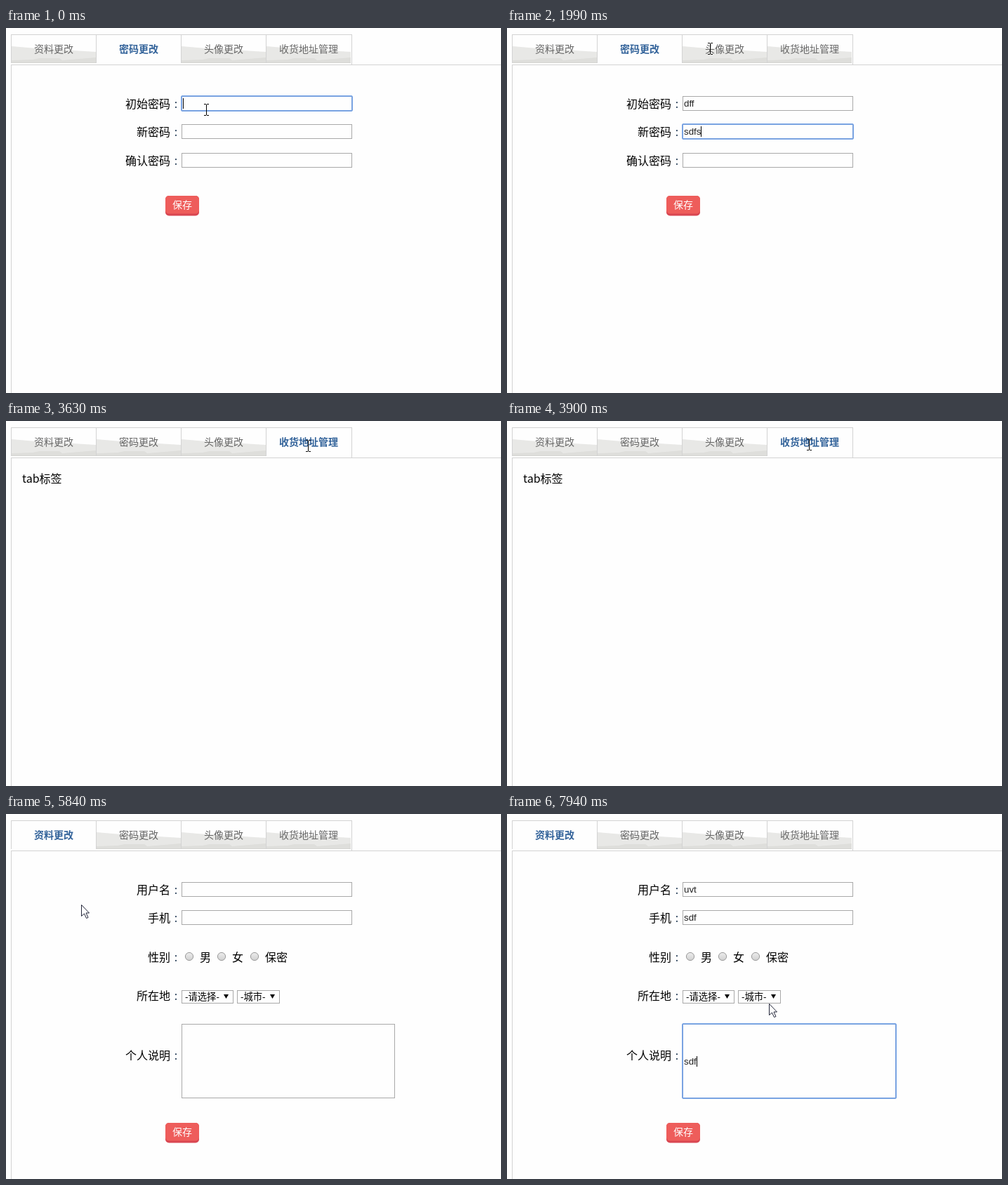
These frames come from a looping animation (705 by 520 pixels, 8 s). An HTML page with a canvas:

```html
<!DOCTYPE html>
<html lang="zh-CN">
<head>
<meta charset="utf-8">
<title>账户设置</title>
<style>
  html, body { margin: 0; width: 100%; height: 100%; overflow: hidden; background: #fefefe; }
  canvas { display: block; }
</style>
</head>
<body>
<canvas id="stage" width="705" height="520"></canvas>
<script>
const ctx = document.getElementById('stage').getContext('2d');
const LOOP = 8000;
const CJK = '"Noto Sans CJK SC", "Noto Sans CJK", sans-serif';
const CENTRED_MARKS = `"Noto Sans CJK TC", ${CJK}`;
const ARIAL = `"Liberation Sans", ${CJK}`;
const PROFILE = 0, PASSWORD = 1, AVATAR = 2, ADDRESS = 3;
const TABS = ['资料更改', '密码更改', '头像更改', '收货地址管理'];
const TAB_X = [7, 128, 249, 370, 492];

// keys: [time of first character, ms per character]
const FIELDS = [
  { page: PASSWORD, y: 97, text: 'dff', focus: [0, 1190], keys: [120, 130] },
  { page: PASSWORD, y: 137, text: 'sdfs', focus: [1190, 2270], keys: [1323, 133] },
  { page: PASSWORD, y: 178, text: '' },
  { page: PROFILE, y: 97, text: 'uvt', focus: [6367, 7037], keys: [6630, 135] },
  { page: PROFILE, y: 137, text: 'sdf', focus: [7037, 7445], keys: [7037, 136] },
  { page: PROFILE, y: 299, w: 303, h: 105, text: 'sdf', focus: [7445, LOOP], keys: [7580, 120] },
];

// Pointer moves in discrete steps; the points are spread evenly over them.
const START = [285, 116];
const MOVES = [
  { from: 120, to: 510, steps: 4, path: [[286, 118], [288, 130], [291, 142], [292, 146]] },
  { from: 1190, to: 1990, steps: 7, path: [[292, 146], [292, 146], [292, 146], [291, 120], [290, 75], [289, 42], [289, 29]] },
  { from: 2270, to: 2270, steps: 1, path: [[289, 31]] },
  { from: 2550, to: 3510, steps: 8, path: [[325, 75], [370, 115], [399, 145], [408, 190], [408, 209], [418, 150], [427, 75], [430, 36]] },
  { from: 3630, to: 3900, steps: 3, path: [[430, 33]] },
  { from: 4180, to: 5150, steps: 8, path: [[424, 70], [330, 85], [160, 70], [63, 38]] },
  { from: 5570, to: 6500, steps: 8, path: [[85, 110], [130, 150], [250, 120], [313, 108]] },
  { from: 6630, to: 7580, steps: 8, path: [[313, 108], [313, 135], [313, 155], [313, 155], [313, 160], [316, 250], [320, 330], [320, 330]] },
  { from: 7700, to: 7940, steps: 3, path: [[374, 271]] },
];

const clamp = (v, lo, hi) => Math.max(lo, Math.min(hi, v));
const stepCount = (t, start, gap) => t < start ? 0 : Math.floor((t - start) / gap + 0.06) + 1;

function pageAt(t) {
  if (t < 2270) return PASSWORD;
  if (t < 3630) return AVATAR;
  return t < 5270 ? ADDRESS : PROFILE;
}

function pointerAt(t) {
  let pos = START;
  for (const { from, to, steps, path } of MOVES) {
    if (t < from) break;
    const gap = (to - from) / (steps - 1) || 1;
    const done = Math.min(stepCount(t, from, gap), steps) / steps * path.length;
    const points = [pos, ...path];
    const i = Math.min(Math.floor(done), path.length - 1);
    const a = points[i], b = points[i + 1], k = done - i;
    pos = [Math.round(a[0] + (b[0] - a[0]) * k), Math.round(a[1] + (b[1] - a[1]) * k)];
  }
  return pos;
}

function rect(x, y, w, h, color) {
  ctx.fillStyle = color;
  ctx.fillRect(x, y, w, h);
}

function frame(x, y, w, h, color) {
  ctx.strokeStyle = color;
  ctx.lineWidth = 1;
  ctx.strokeRect(x + 0.5, y + 0.5, w, h);
}

function roundRect(x, y, w, h, r, color) {
  ctx.fillStyle = color;
  ctx.beginPath();
  ctx.roundRect(x, y, w, h, r);
  ctx.fill();
}

function text(str, x, y, size, color = '#000', { align = 'left', weight = 350, family = CJK } = {}) {
  ctx.font = `${weight} ${size}px ${family}`;
  ctx.textAlign = align;
  ctx.fillStyle = color;
  ctx.fillText(str, x, y);
}

function polygon(points, color) {
  ctx.fillStyle = color;
  ctx.beginPath();
  points.forEach(([x, y]) => ctx.lineTo(x, y));
  ctx.closePath();
  ctx.fill();
}

function drawHills(x) {
  const w = 120;
  ctx.save();
  ctx.beginPath();
  ctx.rect(x, 10, w, 40);
  ctx.clip();
  ctx.translate(x, 0);
  polygon([[0, 26], [35, 29], [70, 31], [w, 34], [w, 50], [0, 50]], '#e8e8e6');
  polygon([[0, 46], [30, 45], [40, 43], [68, 43], [72, 46], [96, 44], [w, 42], [w, 50], [0, 50]], '#dededb');
  rect(0, 49, w, 1, '#d6d6d3');
  ctx.restore();
}

function drawTabs(active) {
  const line = '#d3d3d3';
  TABS.forEach((name, i) => {
    const x = TAB_X[i];
    const on = i === active;
    if (!on) drawHills(x + 1);
    text(name, x + 61, 35, 14, on ? '#33639a' : '#666', { align: 'center', weight: on ? 700 : 350 });
  });
  rect(7, 9, 486, 1, line);
  TAB_X.forEach((x, i) => rect(x, 9, 1, i === 4 ? 43 : 41, line));
  rect(7, 52, 698, 1, line);
  rect(7, 52, 1, 468, line);
}

function drawLabel(str, y) {
  text(str, 234, y + 6, 16, '#000', { align: 'right' });
  text(':', 242, y + 6, 16, '#1d3550', { align: 'center' });
}

function drawButton(str, x, y, w) {
  roundRect(x, y, w, 28.5, 5, '#d94752');
  roundRect(x, y, w, 25.5, 5, '#ee5d5b');
  text(str, x + w / 2, y + 18, 14, '#fff', { align: 'center' });
}

function drawField({ y, w = 242, h = 20, text: full, focus = [-1, -1], keys }, t) {
  const focused = t >= focus[0] - 4 && t < focus[1] - 4;
  frame(250, y, w, h, focused ? '#739ddd' : '#a9a9a9');
  if (focused) {
    ctx.strokeStyle = '#7fa9e6';
    ctx.beginPath();
    ctx.roundRect(249.5, y - 0.5, w + 2, h + 2, 1.5);
    ctx.stroke();
  }
  const typed = keys ? full.slice(0, clamp(stepCount(t, ...keys), 0, full.length)) : '';
  const mid = y + Math.floor(h / 2) + (h > 20 ? 1 : 0);
  text(typed, 252, mid + 5, 13.333, '#222', { family: ARIAL });
  const blinkedOff = t >= 910 && t < 1190;
  if (focused && !blinkedOff) {
    rect(252 + Math.round(ctx.measureText(typed).width), mid - 7, 1, 15, '#000');
  }
}

function drawRadio(x, y) {
  const shade = ctx.createLinearGradient(0, y - 6, 0, y + 6);
  shade.addColorStop(0, '#eee');
  shade.addColorStop(1, '#cfcfcf');
  ctx.beginPath();
  ctx.arc(x, y, 5.6, 0, Math.PI * 2);
  ctx.fillStyle = shade;
  ctx.fill();
  ctx.strokeStyle = '#9a9a9a';
  ctx.lineWidth = 1;
  ctx.stroke();
}

function drawSelect(str, x, w) {
  frame(x, 251, w, 18, '#a9a9a9');
  text(str, x + 5, 265, 13.333, '#000', { family: ARIAL });
  const cx = x + w - 9.5;
  polygon([[cx - 3.5, 257], [cx + 3.5, 257], [cx, 263]], '#000');
}

function drawProfile() {
  drawLabel('用户名', 108);
  drawLabel('手机', 148);
  drawLabel('性别', 204);
  drawLabel('所在地', 259);
  drawLabel('个人说明', 344);
  [['男', 261], ['女', 307], ['保密', 354]].forEach(([str, x]) => {
    drawRadio(x, 203);
    text(str, x + 15, 210, 16);
  });
  drawSelect('-请选择-', 250, 73);
  drawSelect('-城市-', 329, 60);
  drawButton('保存', 227, 440, 48);
}

function drawPassword() {
  drawLabel('初始密码', 108);
  drawLabel('新密码', 148);
  drawLabel('确认密码', 189);
  drawButton('保存', 227, 239, 48);
}

function drawAvatar() {
  rect(141, 105, 150, 150, '#c5cde0');
  ctx.fillStyle = '#e4e8f1';
  ctx.beginPath();
  ctx.moveTo(141, 255);
  ctx.lineTo(141, 243);
  ctx.bezierCurveTo(148, 222, 172, 217, 190, 211);
  ctx.quadraticCurveTo(201, 207, 200, 194);
  ctx.bezierCurveTo(188, 185, 184, 171, 181, 156);
  ctx.bezierCurveTo(181, 130, 195, 118, 214, 117);
  ctx.bezierCurveTo(234, 118, 246, 126, 251, 144);
  ctx.bezierCurveTo(247, 160, 248, 182, 238, 194);
  ctx.quadraticCurveTo(236, 207, 247, 211);
  ctx.bezierCurveTo(266, 217, 284, 222, 291, 243);
  ctx.lineTo(291, 255);
  ctx.fill();
  text('从电脑中选择你喜欢的图片', 345, 137, 14, '#f00');
  [['JPG、JPEG、', 345], ['GIF、', 419], ['或PNG等文件.', 452]]
    .forEach(([str, x]) => text(str, x, 165, 12, '#222', { family: CENTRED_MARKS }));
  drawButton('选择上传', 358, 217, 76);
}

function drawAddress() {
  text('tab标签', 23, 88, 16);
}

const PAGES = [drawProfile, drawPassword, drawAvatar, drawAddress];

function overText(page, x, y) {
  if (y > 20 && y < 44 && x > 30) return true;
  return FIELDS.some(f => f.page === page && x > 249 && x < 251 + (f.w || 242) && y >= f.y && y <= f.y + (f.h || 20));
}

function drawBeam(x, y) {
  rect(x, y - 7, 1, 15, '#000');
  for (const end of [y - 8, y + 8]) {
    rect(x - 3, end, 3, 1, '#000');
    rect(x + 1, end, 3, 1, '#000');
  }
}

function drawArrow(x, y) {
  ctx.save();
  ctx.translate(x - 0.5, y - 0.5);
  polygon([[0, 0], [0, 16], [4, 12.5], [7, 19], [9.5, 18], [6.5, 11.5], [11, 11.5]], '#fff');
  ctx.strokeStyle = '#23263a';
  ctx.lineWidth = 1;
  ctx.stroke();
  ctx.restore();
}

function render(now) {
  const t = now % LOOP;
  const page = pageAt(t);
  rect(0, 0, 705, 520, '#fefefe');
  drawTabs(page);
  PAGES[page]();
  FIELDS.filter(f => f.page === page).forEach(f => drawField(f, t));
  const [x, y] = pointerAt(t);
  (overText(page, x, y) ? drawBeam : drawArrow)(x, y);
  requestAnimationFrame(render);
}

render(0);
</script>
</body>
</html>
```
